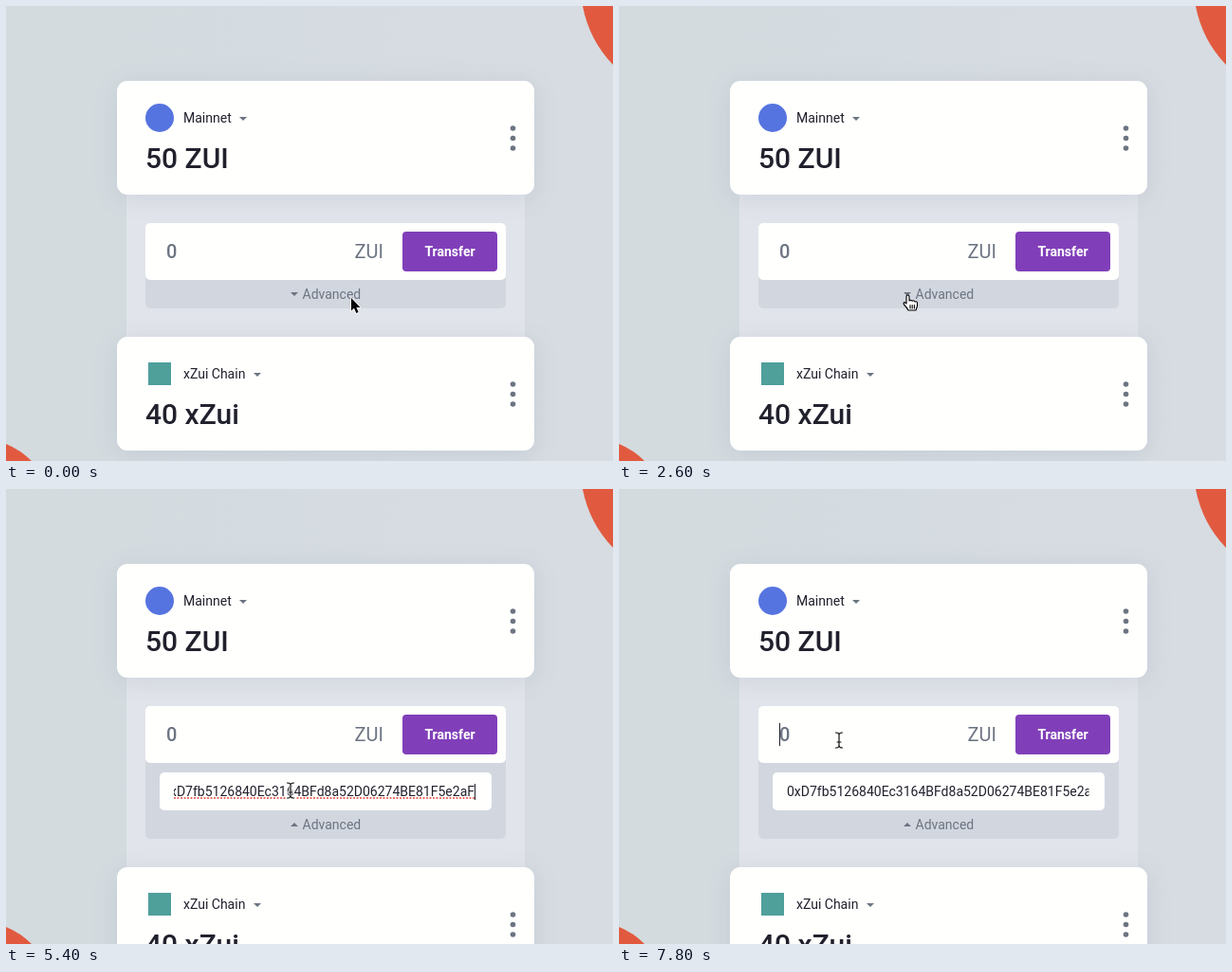
Write an HTML page that moves like this. It is 640 px wide and 480 px high and loops after 8 s.

```html
<!DOCTYPE html>
<html lang="en">
<head>
<meta charset="utf-8">
<title>Token transfer</title>
<style>
  html, body { margin: 0; width: 100%; height: 100%; overflow: hidden; background: #d5dce0; }
  svg { display: block; width: 100%; height: 100%; font: 14px Roboto, sans-serif; }
  .blob { fill: #e15a3f; }
  .card { fill: #fffffe; filter: drop-shadow(0 4px 12px rgba(50, 70, 100, .1)); }
  .field { fill: #fffffe; }
  .dark { fill: #20212c; }
  .gray { fill: #6c7482; }
  .balance { font-size: 30px; font-weight: 500; }
  .amount { font-size: 20px; }
  .bold { font-weight: 700; }
  .caret { fill: #20212c; }
  .typo { stroke: #e4574e; stroke-width: 2.2; stroke-linecap: round; stroke-dasharray: 0 3.5; }
</style>
</head>
<body>
<svg viewBox="0 0 640 480">
  <defs>
    <linearGradient id="sky">
      <stop stop-color="#d3dbdf"/><stop offset="1" stop-color="#d7dce2"/>
    </linearGradient>
    <clipPath id="inputClip"><path d="M177 300H495.5V338H177Z"/></clipPath>
    <path id="down" d="M-4 -2H4L0 2Z"/>
    <g id="menu"><circle cy="-10.5" r="2.8"/><circle r="2.8"/><circle cy="10.5" r="2.8"/></g>
  </defs>

  <rect width="640" height="480" fill="url(#sky)"/>
  <path class="blob" d="M608 0Q615 36 640 62V0Z"/>
  <path class="blob" d="M0 462Q15 468 27 480H0Z"/>

  <rect id="panel" x="127" y="190" width="420" height="170" fill="#e1e4ea"/>

  <rect class="card" x="117" y="79" width="440" height="120" rx="11"/>
  <circle cx="162" cy="118" r="15" fill="#5674df"/>
  <text class="dark" x="187" y="123">Mainnet</text>
  <use href="#down" class="gray" x="250" y="119"/>
  <text class="dark balance" x="147" y="171">50 ZUI</text>
  <use href="#menu" class="gray" x="534.5" y="139.5"/>

  <rect id="drawer" x="147" y="280" width="380" height="39" rx="5" fill="#d2d7df"/>
  <rect class="field" x="147" y="229" width="380" height="60" rx="5"/>
  <text class="gray amount" x="169" y="266" font-weight="500">0</text>
  <text class="gray amount" x="398" y="266" text-anchor="end">ZUI</text>
  <rect x="418" y="238" width="100" height="42" rx="4" fill="#803fb9"/>
  <text class="bold" x="468" y="264" text-anchor="middle" fill="#fff">Transfer</text>
  <rect id="amountCaret" class="caret" x="169" y="247" width="1" height="24"/>

  <g id="recipient">
    <rect class="field" x="162" y="299" width="350" height="40" rx="5"/>
    <text id="placeholder" class="gray" x="177" y="324">Recipient Address</text>
    <g clip-path="url(#inputClip)">
      <text id="address" class="dark" y="324">0xD7fb5126840Ec3164BFd8a52D06274BE81F5e2aF</text>
      <path id="typo" class="typo" d="M178 326H494"/>
    </g>
    <rect id="recipientCaret" class="caret" y="311" width="1" height="17"/>
  </g>

  <g id="advanced" class="gray">
    <use id="toggle" href="#down"/>
    <text x="312.5" y="309">Advanced</text>
  </g>

  <g id="lower">
    <rect class="card" x="117" y="349" width="440" height="120" rx="11"/>
    <rect x="150" y="376" width="24" height="24" fill="#4f9f9b"/>
    <text class="dark" x="187" y="393">xZui Chain</text>
    <use href="#down" class="gray" x="265" y="389"/>
    <text class="dark balance" x="147" y="441">40 xZui</text>
    <use href="#menu" class="gray" x="534.5" y="409.5"/>
  </g>

  <g id="cursor" stroke-linejoin="round" stroke-linecap="round">
    <path id="arrow" d="M0 0V13.5L3 10.8 5.3 16 7.6 15 5.4 10H9.5Z" fill="#000"
      stroke="#fff" stroke-width="1.6" paint-order="stroke"/>
    <path id="hand" d="M-2 10V2.5Q-2 1 -.5 1T1 2.5V7Q2.5 5.5 4 7.2 5.8 6 7 8 9.5 7 9.5 9.5V12.5Q9 14 8 17H0Q-1.5 14 -4.5 11 -5.5 9 -4 8.6 -3 8.6 -2 10ZM2 11.5V15M4.2 11.5V15M6.4 11.5V15"
      fill="#fff" stroke="#000" stroke-width="1.1"/>
    <g id="beam" fill="none">
      <path d="M-3.5 -8Q0 -8 0 -5.5 0 -8 3.5 -8M0 -5.5V5.5M-3.5 8Q0 8 0 5.5 0 8 3.5 8M-2 2H2" stroke="#fff" stroke-width="2.8"/>
      <path d="M-3.5 -8Q0 -8 0 -5.5 0 -8 3.5 -8M0 -5.5V5.5M-3.5 8Q0 8 0 5.5 0 8 3.5 8M-2 2H2" stroke="#111" stroke-width="1.2"/>
    </g>
  </g>
</svg>
<script>
const LOOP = 8000;
const HOVER = 2200, OPEN = 2700, BEAM = 3200, FOCUS = 4600, PASTE = 5300, AMOUNT = 6700;
// Pointer stops: time, x, y
const STOPS = [
  [200, 364, 308], [1600, 305, 301], [1900, 305, 301], [2300, 305, 304],
  [3000, 305, 304], [3900, 300, 318], [5500, 300, 318], [6300, 232, 265]
];

const $ = id => document.getElementById(id);
const show = (id, visible) => $(id).setAttribute('display', visible ? 'inline' : 'none');
const set = (id, name, value) => $(id).setAttribute(name, value);
const blink = elapsed => elapsed >= 0 && elapsed % 1000 < 500;

function pointerAt(t) {
  const next = STOPS.findIndex(stop => stop[0] > t);
  if (next === 0) return STOPS[0].slice(1);
  if (next < 0) return STOPS.at(-1).slice(1);
  const [t0, x0, y0] = STOPS[next - 1], [t1, x1, y1] = STOPS[next];
  const p = (t - t0) / (t1 - t0), ease = p * p * (3 - 2 * p);
  return [x0 + (x1 - x0) * ease, y0 + (y1 - y0) * ease];
}

function draw(t) {
  const open = t >= OPEN, pasted = t >= PASTE, inAmount = t >= AMOUNT;
  const shift = open ? 50 : 0;
  set('panel', 'height', 170 + shift);
  set('drawer', 'height', 39 + shift);
  set('lower', 'transform', `translate(0 ${shift})`);
  set('advanced', 'transform', `translate(0 ${shift})`);
  set('toggle', 'transform', `translate(304 304) scale(1 ${open ? -1 : 1})`);

  show('recipient', open);
  show('placeholder', !pasted);
  show('address', pasted);
  set('address', 'x', inAmount ? 177 : 494);
  set('address', 'text-anchor', inAmount ? 'start' : 'end');
  show('typo', pasted && !inAmount);
  set('recipientCaret', 'x', pasted ? 494 : 177);
  show('recipientCaret', !inAmount && blink(t - (pasted ? PASTE : FOCUS)));
  show('amountCaret', blink(t - AMOUNT));

  set('cursor', 'transform', `translate(${pointerAt(t)})`);
  const hand = t >= HOVER && t < OPEN, beam = t >= BEAM;
  show('hand', hand);
  show('beam', beam);
  show('arrow', !hand && !beam);
}

const start = performance.now();
function tick() {
  draw((performance.now() - start) % LOOP);
  requestAnimationFrame(tick);
}
tick();
</script>
</body>
</html>
```
